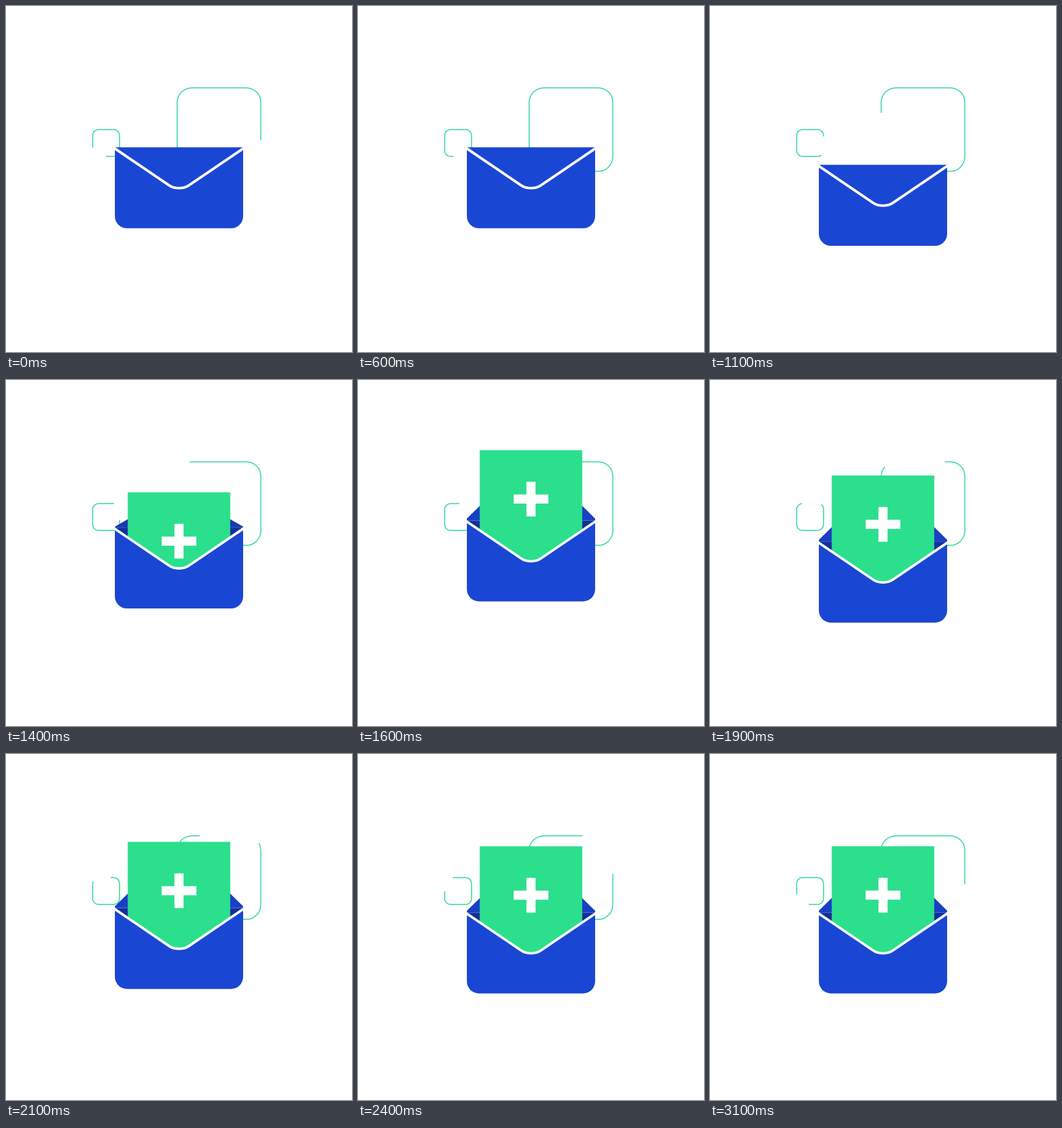
Write an HTML page with a canvas that moves like this. It is 518 px wide and 518 px high and loops after 3200 ms.

```html
<!DOCTYPE html>
<html lang="en">
<head>
<meta charset="utf-8">
<title>Envelope</title>
<style>
  html, body { margin: 0; width: 100%; height: 100%; overflow: hidden; background: #fff; }
  canvas { display: block; width: 518px; height: 518px; }
</style>
</head>
<body>
<canvas id="stage" width="518" height="518"></canvas>
<script>
const ctx = document.getElementById('stage').getContext('2d');
const LOOP = 3200, STEP = 100;
const GREEN = '#2bdf8d', LINE = '#35d896', BLUE = '#1a46d4', INNER = '#12309a';
const LEFT = 163, RIGHT = 355, MID = 259, HEIGHT = 121.2;
const START_TOP = 211.6, REST_TOP = 237.2, SPRING_AT = 1381;

const progress = (t, begin, duration) => Math.min(1, Math.max(0, (t - begin) / duration));
const easeInOut = p => (1 - Math.cos(Math.PI * p)) / 2;
const easeOutBack = (p, c) => 1 + (c + 1) * (p - 1) ** 3 + c * (p - 1) ** 2;

// The envelope sinks to gather force, then springs up and settles.
function envelopeTop(t) {
  if (t < SPRING_AT) return START_TOP + 33.5 * easeInOut(progress(t, 650, 650));
  const fade = (1 - progress(t, SPRING_AT, 1050)) ** 2;
  return REST_TOP - 77 * fade * Math.sin(Math.PI * (t - SPRING_AT) / 270);
}

const letterRise = t => 99 * easeOutBack(progress(t, 1335, 427), 1.3);

// 1 is folded down, negative is opened upward.
const flapScale = t => 1 - 2.45 * easeInOut(progress(t, 1200, 300));

// Strokes four fifths of a rounded square, clockwise from the left end of its top edge.
function dashedSquare(x, y, size, r, begin) {
  const x2 = x + size, y2 = y + size;
  const length = 4 * size - 8 * r + 2 * Math.PI * r;
  ctx.beginPath();
  ctx.moveTo(x + r, y);
  ctx.arcTo(x2, y, x2, y2, r);
  ctx.arcTo(x2, y2, x, y2, r);
  ctx.arcTo(x, y2, x, y, r);
  ctx.arcTo(x, y, x2, y, r);
  ctx.closePath();
  ctx.setLineDash([length * 0.8, length * 0.2]);
  ctx.lineDashOffset = -begin * length;
  ctx.stroke();
  ctx.setLineDash([]);
}

function drawSquares(t) {
  const p = progress(t, 145, 2990);
  ctx.strokeStyle = LINE;
  ctx.lineWidth = 1.5;
  dashedSquare(256.3, 122.4, 125.2, 22, 0.571 + p);
  dashedSquare(129.7, 185, 40.3, 9, 1.777 - p);
}

function foldLine() {
  ctx.lineTo(LEFT, 1.8);
  ctx.lineTo(244, 56.8);
  ctx.bezierCurveTo(252, 62.5, 266, 62.5, 274, 56.8);
  ctx.lineTo(RIGHT, 1.8);
}

function drawFlap(scale, color) {
  ctx.save();
  ctx.scale(1, scale);
  ctx.beginPath();
  ctx.moveTo(LEFT, 0);
  foldLine();
  ctx.lineTo(RIGHT, 0);
  ctx.fillStyle = color;
  ctx.fill();
  ctx.restore();
}

function drawInside(flap) {
  ctx.fillStyle = INNER;
  ctx.fillRect(LEFT, 0, RIGHT - LEFT, 70);
  if (flap > 0) return;
  drawFlap(flap, `hsl(226, 78%, ${33 - 7 * flap}%)`);
  ctx.fillStyle = 'rgba(90, 125, 225, 0.6)';
  ctx.fillRect(LEFT, -0.4, RIGHT - LEFT, 0.9);
}

function drawLetter(rise) {
  ctx.fillStyle = GREEN;
  ctx.fillRect(182.3, -rise, 153.4, rise + 90);
  ctx.fillStyle = '#fff';
  ctx.fillRect(233, 66.3 - rise, 52, 13.6);
  ctx.fillRect(252.2, 47.2 - rise, 13.6, 52);
}

function drawPocket() {
  const r = 18;
  ctx.beginPath();
  foldLine();
  ctx.arcTo(RIGHT, HEIGHT, MID, HEIGHT, r);
  ctx.arcTo(LEFT, HEIGHT, LEFT, 0, r);
  ctx.closePath();
  ctx.fillStyle = BLUE;
  ctx.fill();
}

function drawFold() {
  ctx.beginPath();
  foldLine();
  ctx.strokeStyle = '#fff';
  ctx.lineWidth = 3.8;
  ctx.lineCap = 'square';
  ctx.stroke();
  ctx.lineCap = 'butt';
}

function drawEnvelope(t) {
  const flap = flapScale(t);
  ctx.save();
  ctx.translate(0, envelopeTop(t));
  if (flap < 1) {
    drawInside(flap);
    drawLetter(letterRise(t));
  }
  drawPocket();
  if (flap > 0) drawFlap(flap, BLUE);
  drawFold();
  ctx.restore();
}

const start = performance.now();

function frame() {
  const elapsed = (performance.now() - start) % LOOP;
  const t = Math.floor(elapsed / STEP) * STEP;
  ctx.fillStyle = '#fff';
  ctx.fillRect(0, 0, 518, 518);
  drawSquares(t);
  drawEnvelope(t);
  requestAnimationFrame(frame);
}
frame();
</script>
</body>
</html>
```
